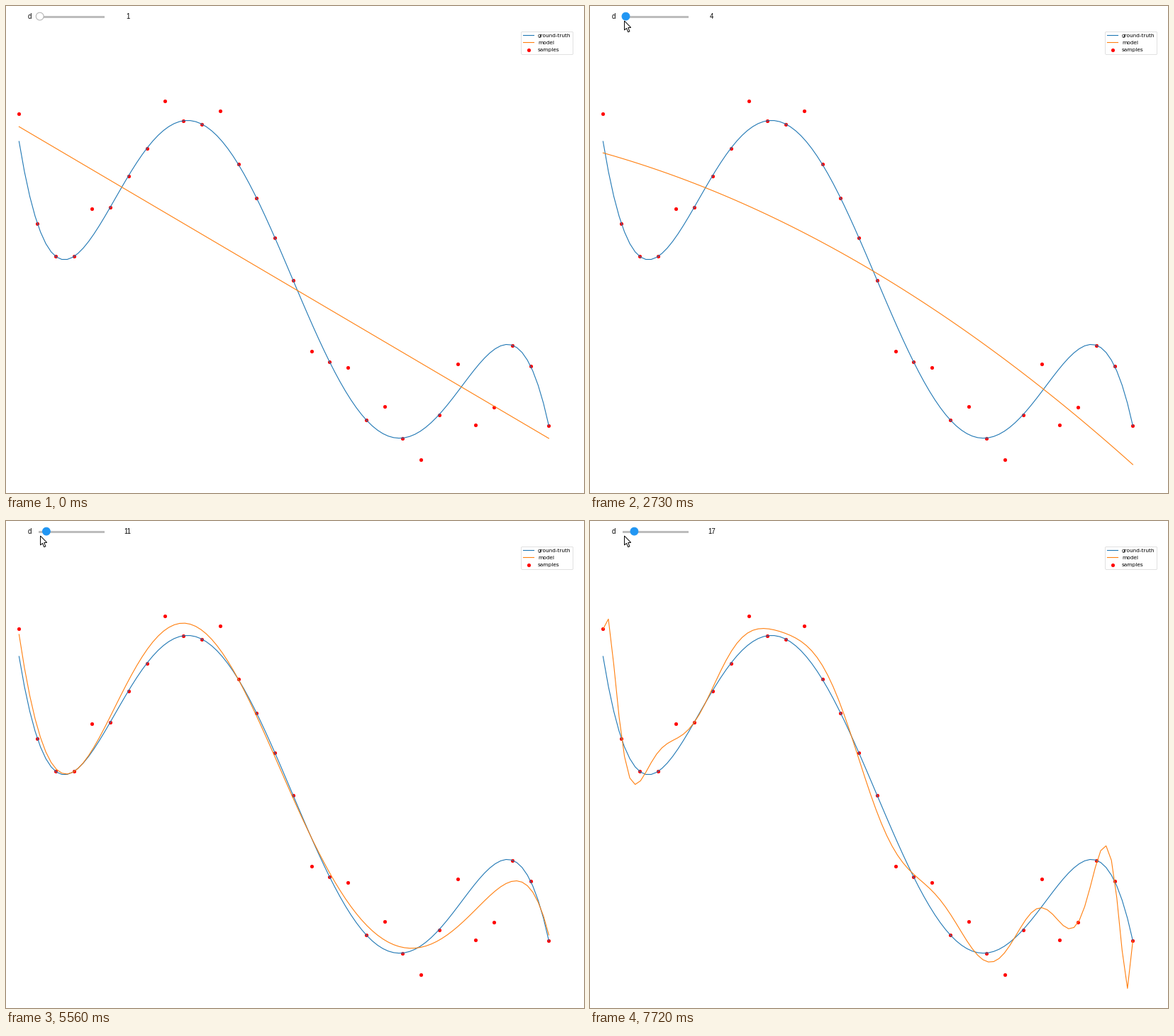
Animation, 815 px wide and 687 px high, one loop 8000 ms. Source, as a matplotlib script:

```python
import matplotlib.pyplot as plt
import numpy as np
from matplotlib.animation import FuncAnimation
from matplotlib.patches import Circle, Polygon

WIDTH, HEIGHT, DPI = 815, 687, 100
LOOP, STEP = 8000, 20
PT = 72 / DPI          # points per pixel
EM = 7.36              # legend font size in pixels
GREY, ACCENT = "#bdbdbd", "#2196f3"


def polynomial_fit(x, y, degree):
    return np.polynomial.Polynomial.fit(x, y, degree)(grid)


def steps_reached(times, t):
    return int(np.searchsorted(times, t, side="right"))


# Noisy samples at even spacing, in stage pixels
sample_x = np.linspace(18.4, 765.4, 30)
sample_y = np.array([
    152, 306.5, 353.2, 353.2, 286, 283.5, 239.5, 200.5, 133.5, 161.5,
    166.5, 147.5, 223.2, 271, 327, 386.5, 486.5, 502, 509.5, 583.5,
    564.5, 609.5, 639.5, 577, 505, 591, 565.5, 478.5, 508, 592])
outliers = [0, 4, 8, 11, 16, 18, 20, 22, 24, 25, 26]

grid = np.linspace(sample_x[0], sample_x[-1], 100)
truth_x = np.append(np.delete(sample_x, outliers), [sample_x[0], 642, 706])
truth_y = np.append(np.delete(sample_y, outliers), [191, 536.5, 477.6])
truth = polynomial_fit(truth_x, truth_y, 8)

# The readout steps 1, 2, 3, ...; the fit lags behind and skips degrees
slider_times = [1980, 2400, 2730, 3160, 3390, 4020, 4470, 4900,
                5230, 5560, 5990, 6420, 6750, 6970, 7410, 7620]
fit_times = [2400, 2940, 3470, 4020, 4580, 5020, 5760, 6420, 7070, 7720]
degrees = [1, 2, 3, 4, 6, 7, 8, 9, 11, 13, 15]
fits = [polynomial_fit(sample_x, sample_y, d) for d in degrees]

cursor_times = [430, 540, 650, 760, 860, 970, 1080, 1200, 1430]
cursor_path = [(434, 234), (305, 142), (196, 72), (122, 30), (76, 11),
               (55, 19), (48, 31), (48, 21), (48, 20.5)]
arrow = np.array([(0, 0), (0, 13), (3, 10.4), (5.2, 15.7),
                  (7.4, 14.8), (5.2, 9.6), (9.2, 9.4)])
HOVER, PRESS, RELEASE = 1430, 1640, 1750

fig = plt.figure(figsize=(WIDTH / DPI, HEIGHT / DPI), dpi=DPI, facecolor="white")
ax = fig.add_axes([0, 0, 1, 1])
ax.set_xlim(0, WIDTH)
ax.set_ylim(HEIGHT, 0)
ax.axis("off")

line_width = 1.5 * EM / 10 * PT
ax.plot(grid, truth, color="C0", lw=line_width, label="ground-truth")
model, = ax.plot(grid, fits[0], color="C1", lw=line_width, label="model")
ax.scatter(sample_x, sample_y, s=(0.6 * EM * PT) ** 2, color="red",
           lw=0.1 * EM * PT, zorder=1, label="samples")
legend = ax.legend(loc="upper right", bbox_to_anchor=(799.4, 35.8),
                   bbox_transform=ax.transData, borderaxespad=0,
                   fontsize=EM * PT)
legend.get_frame().set_linewidth(0.1 * EM * PT)


def slider_text(x, text):
    return ax.text(x, 18, text, fontsize=9.6 * PT, family="Liberation Sans",
                   ha="center", va="baseline")


slider_text(33.5, "d")
readout = slider_text(171.5, "1")
ax.plot([47, 137], [14.6, 14.6], color=GREY, lw=3 * PT,
        solid_capstyle="projecting", zorder=3)
handle = ax.add_patch(Circle((47.7, 14.6), 5.4, lw=PT, zorder=4))
cursor = ax.add_patch(Polygon(arrow, closed=True, fc="white", ec="black",
                              lw=0.95 * PT, joinstyle="miter", zorder=5))


def update(frame):
    t = frame * STEP + STEP / 2
    value = 1 + steps_reached(slider_times, t)
    readout.set_text(str(value))
    model.set_ydata(fits[steps_reached(fit_times, t)])

    hovered = t >= HOVER
    handle.set_center((47.7 + 0.92 * (value - 1), 14.6))
    handle.set_radius(7 if PRESS <= t < RELEASE else 5.4)
    handle.set_facecolor(ACCENT if hovered else "white")
    handle.set_edgecolor(ACCENT if hovered else "#b0b0b0")

    stop = steps_reached(cursor_times, t)
    cursor.set_visible(stop > 0)
    cursor.set_xy(arrow + cursor_path[max(stop - 1, 0)] + np.array([0.5, 0.5]))
    return model, readout, handle, cursor


animation = FuncAnimation(fig, update, frames=LOOP // STEP, interval=STEP,
                          repeat=True, repeat_delay=0, blit=False)
plt.show()
```
